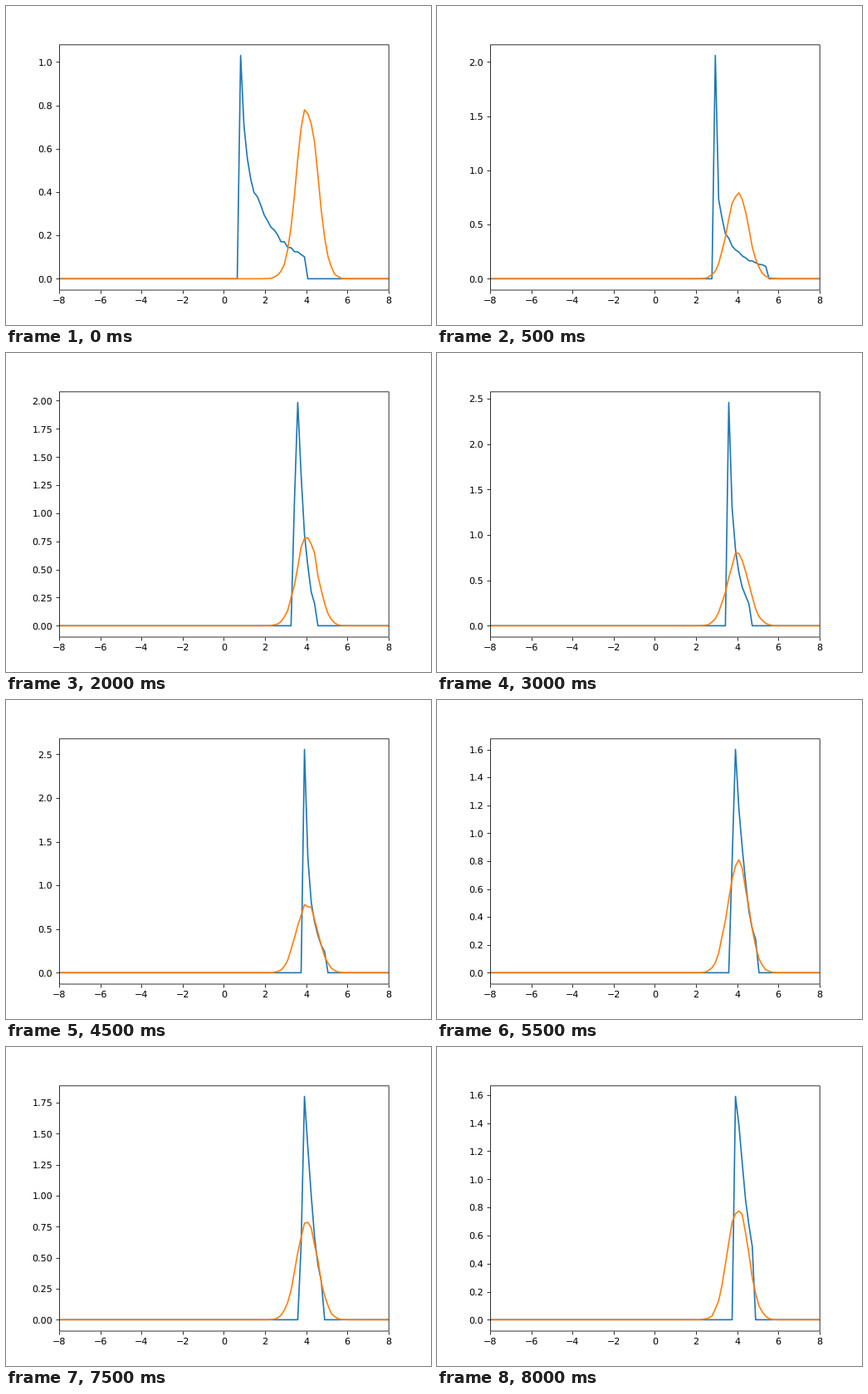
Animation, 512 px wide and 384 px high, one loop 8500 ms. Source, as a matplotlib script:

```python
import numpy as np
import matplotlib.pyplot as plt
from matplotlib.animation import FuncAnimation
from matplotlib.patches import Rectangle

INTERVAL = 500
WIDTH, HEIGHT = 512, 384
LIMIT, BINS = 8, 99
MID = BINS // 2
AREA = BINS / (2 * LIMIT)  # sum of the densities of a whole histogram
SAMPLES = 20000

# Highest generated density at each training step
PEAKS = [1.03, 2.06, 2.2, 1.85, 1.985, 1.85, 2.46, 1.94, 1.985,
         2.555, 1.92, 1.6, 1.55, 1.766, 1.82, 1.8, 1.59]

# Key points of the generated data: lower edge and width, in bins
KEY_STEPS = [0, 1, 4, 6, 9, 13, 16]
KEY_EDGES = [5, 18, 21.45, 22, 24, 23, 24]
KEY_WIDTHS = [20, 16, 6, 7, 7, 7, 6]

x = np.linspace(-LIMIT, LIMIT, BINS)


def tail(peak, count, area):
    """Stretched exponential fall from the peak, with the given sum."""
    power = 2 * AREA / (peak * count)
    reach = np.arange(count) ** power
    low, high = 0, 20
    for _ in range(40):
        rate = (low + high) / 2
        if peak * np.exp(-rate * reach).sum() > area:
            low = rate
        else:
            high = rate
    return peak * np.exp(-rate * reach)


def generated_density(step):
    rng = np.random.default_rng(step)
    peak = PEAKS[step]
    edge = np.interp(step, KEY_STEPS, KEY_EDGES)
    count = round(np.interp(step, KEY_STEPS, KEY_WIDTHS))
    first = MID + int(np.ceil(edge))
    partial = (np.ceil(edge) - edge) * peak

    values = tail(peak, count, AREA - partial)
    values[1:] *= 1 + 0.05 * rng.uniform(-1, 1, count - 1)
    density = np.zeros(BINS)
    density[first - 1] = partial
    density[first:first + count] = np.minimum(values, peak)
    return density


def real_density(step):
    rng = np.random.default_rng(step)
    data = rng.normal(4, 0.5, SAMPLES)
    return np.histogram(data, BINS, (-LIMIT, LIMIT), density=True)[0]


plt.rcParams["text.hinting"] = "no_hinting"
fig, ax = plt.subplots(figsize=(WIDTH / 80, HEIGHT / 80), dpi=80)
generated, = ax.plot(x, generated_density(0))
real, = ax.plot(x, real_density(0))
ax.set_xlim(-LIMIT, LIMIT)
ax.tick_params(width=0.72)

# Soft, unsnapped border in place of the spines
ax.spines[:].set_visible(False)
ax.add_artist(Rectangle((64.4 / WIDTH, 42 / HEIGHT), 396.8 / WIDTH, 295.2 / HEIGHT,
                        transform=fig.transFigure, fill=False, linewidth=0.72,
                        snap=False, clip_on=False, zorder=2.5))


def update(step):
    generated.set_ydata(generated_density(step))
    real.set_ydata(real_density(step))
    ax.relim()
    ax.autoscale_view(scalex=False)
    return generated, real


anim = FuncAnimation(fig, update, frames=len(PEAKS), interval=INTERVAL,
                     repeat=True, repeat_delay=0, blit=False)
plt.show()
```
